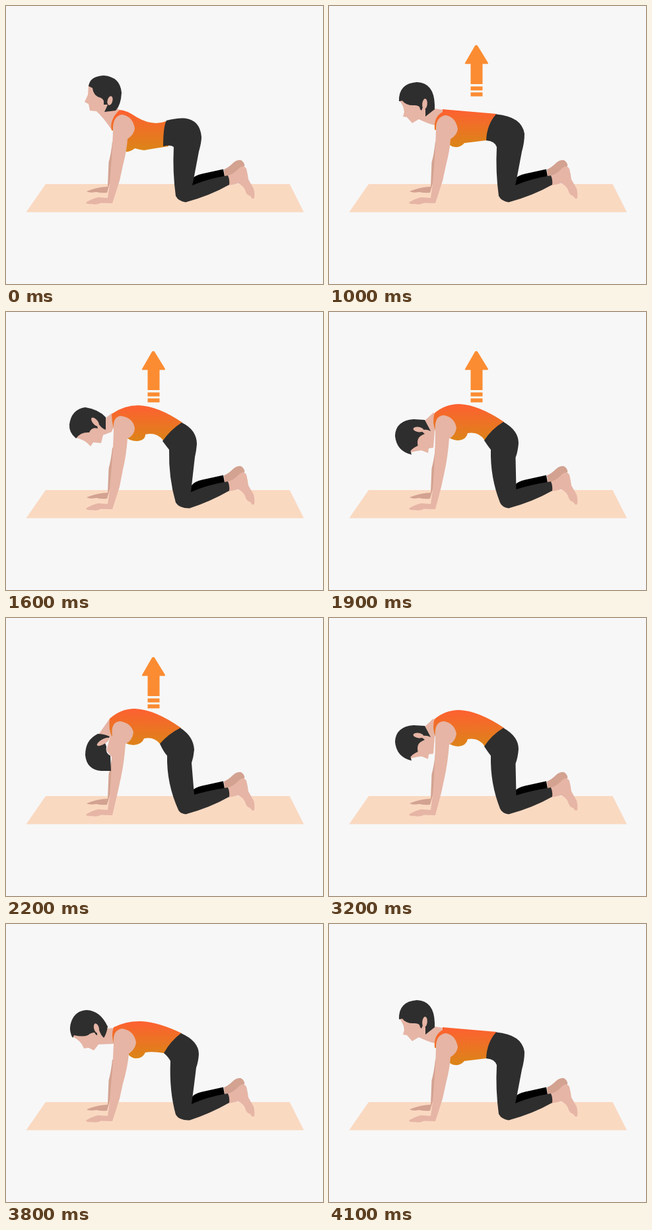
These frames come from a looping animation (480 by 420 pixels, 4600 ms). An HTML page:

```html
<!DOCTYPE html>
<html lang="en">
<head>
<meta charset="utf-8">
<title>Cat stretch</title>
<style>
  html, body { margin: 0; width: 100%; height: 100%; overflow: hidden; background: #f7f7f7; }
  svg { display: block; width: 480px; height: 420px; }
  .skin { fill: #e6b5a5; }
  .shade { fill: #d3a291; }
  .dark { fill: #2e2e2e; }
  .top { fill: url(#fabric); }
  .pose { opacity: 0; }
</style>
</head>
<body>
<svg id="stage" viewBox="0 0 480 420">
  <defs>
    <linearGradient id="fabric" x1="0" y1="0" x2="0" y2="1">
      <stop offset="0.05" stop-color="#fc6230"/>
      <stop offset="0.95" stop-color="#dc8418"/>
    </linearGradient>
  </defs>
  <path fill="#fad9c1" d="M60 269H429.500L451 311.500H30.500Z"/>
  <path class="shade" d="M330 247Q337 244 344 237Q350 232 356 233Q362 237 361 242L345 254L331 258Z"/>
  <path d="M276 272L281 262Q285 256 297 253.500L329 246.500L331 258L284 274Z"/>
  <path class="skin" d="M336 257Q347 252 353 245Q360 239 364 246Q366 254 367 262L375 276Q377 284 376 290Q373 293 370 287Q365 286 363 281Q361 272 352 268L337 271Z"/>
  <path class="shade" d="M161 205Q159 224 155.500 236L154 273Q140 273 122 280Q126 283 137 281Q144 283 153 282L165 240L166 205Z"/>
  <g id="poses"></g>
  <g id="arrow" class="pose" fill="#fb8c32">
    <path d="M221 60Q223 58 225 60L241 86Q241 87.500 240 87.500H232.500V118H214.500V87.500H207Q205 87.500 206 86Z"/>
    <path d="M214.500 121.500h18v6h-18zM214.500 130.500h18v6h-18z"/>
  </g>
</svg>
<script>
  const LOOP = 4600;

  // Parts shared by every pose: hand with wrist, and the near shin.
  const HAND = 'M161 298L144 297.500Q136 301 130 299Q123 300 121 297Q128 292 139 289L154 290Q157 272 158 255';
  const SHIN = 'Q305 261 336 256Q339 263 338 270Q309 286.500 ';

  // ear: cx, cy, rx, ry, tilt
  const poses = {
    arch: {
      face: 'M125 119L124 134L119 145L125 148L127 158L137 159Q147 168 160 187L174 170L172 157L160 150L140 112Z',
      hair: 'M125 121Q127 106 148 105Q173 107 175 131Q174 150 166 158L149 160Q152 154 154 149L148 149Q149 141 144 139Q132 136 131 124Z',
      ear: [157.5, 143, 3.8, 7, 15],
      top: 'M172 157Q182 157 198 168Q222 182 243 174L246 212Q225 215 209 218Q202 217 195 215Q188 221 181 220L178 190L160 188Q156 172 172 157Z',
      legs: 'M243 173Q258 169 270 169.500Q294 172 296 198Q296 206 292 220L284 262L282 271' + SHIN + '272 296.500Q261 295 257 287Q252 250 254 213Q249 209 238 212Q238 182 243 173Z',
      arm: 'Q161 220 162 188Q161 166 176 164Q192 167 195 185Q194 194 184 201Q183 218 177 241L172 264Z'
    },
    flat: {
      face: 'M106 142Q113 150 114 160L112 167L118 168L126 177L136 171Q150 178 160 180L166 172L174 157L160 155L140 130Z',
      hair: 'M106 144Q105 117 133 115Q159 116 160 149L160 156L146 167L146 156L142 153L140 158L138 156Q138 150 130 150Q117 151 111 143Z',
      ear: [145, 148, 3.8, 8, 5],
      top: 'M172 156L254 163L246 204L238 203Q222 205 205 207Q199 214 191 213Q186 213 182 209L178 190L160 187Q158 168 172 160Z',
      legs: 'M253 163.500Q292 167 296 193Q296 206 292 220L284 262L282 271' + SHIN + '272 296.500Q261 295 257 287Q252 250 254 213Q251 204 238 203Q239 179 253 163.500Z',
      arm: 'Q161 220 162 188Q161 167 177 165Q192 168 195 186Q194 195 184 201Q183 218 177 241L172 264Z'
    },
    rise: {
      face: 'M98 169Q110 174 115 182L118 188L125 187L133 191L140 182L163 181L168 165L163 157L153 158L125 150Z',
      hair: 'M101 172Q94 160 99 147Q105 131 122 130Q143 131 154 155Q152 167 148 172Q143 167 141 160L138 161L138 168Q136 168 134 164Q129 164 124 168Q117 171 103 168Z',
      ear: [137, 157.5, 3.8, 7.5, -15],
      top: 'M163 156Q183 146 205 147Q230 148 266 165L246 198L239 195Q222 192 211 194Q207 203 197 203Q191 203 186 198L178 184L163 180Q159 167 163 156Z',
      legs: 'M265 165Q292 177 292 197Q291 209 288 217Q285 242 281 272' + SHIN + '278 296.500Q262 297 257 288Q247 252 249 207Q246 201 239 195Q249 177 265 165Z',
      arm: 'Q162 218 163 180Q161 160 176 158Q194 161 197 179Q196 189 186 196Q184 218 177 241L172 264Z'
    },
    round: {
      face: 'M106 190Q120 193 128 203L132 197L144 198L147 186L160 181L166 165L160 153L151 160L125 165Z',
      hair: 'M106 191Q95 182 96 170Q99 147 120 144Q140 147 151 159L151 178Q144 175 141 170L138 172L139 176Q130 173 126 182Q113 181 106 191Z',
      ear: [135, 166, 3.8, 8, -40],
      top: 'M160 154Q178 141 201 141Q230 142 267 167L244 198L238 194Q228 181 211 185Q211 194 198 195Q190 195 184 191L178 180L163 177Q160 165 160 154Z',
      legs: 'M266 167Q289 178 289 200Q288 211 286 219Q283 245 280 272' + SHIN + '278 296.500Q263 297 257 288Q246 250 247 208Q243 203 237 195Q249 178 266 167Z',
      arm: 'Q162 215 163 178Q161 158 174 157Q193 160 195 176Q194 187 184 191Q182 218 177 238L172 264Z'
    },
    curl: {
      face: 'M124 212L133 210L140 209L150 213L151 206L158 205L160 180L166 165L158 152L144 165L125 190Z',
      hair: 'M125 215.500Q102 210 100 187Q101 164 128 162L145 163L154 180Q148 177 143 178L140 180L145 184Q138 187 136 190Q133 194 134.500 202Q126 206 123.500 210Z',
      ear: [135.5, 177.5, 8, 3.8, 8],
      top: 'M159.500 153Q176 139 197 139Q226 140 265 166L242 198L236 194Q227 180 210 183Q208 193 196 194Q189 194 182 190L176 180L161 178Q156 168 159.500 153Z',
      legs: 'M264 166Q287 179 287 198Q286 211 282.500 220L283.500 268' + SHIN + '272 296.500Q262 295 259 288Q244 250 245 208Q241 203 235 194Q246 177 264 166Z',
      arm: 'Q161 210 161 178Q159 157 174 156Q190 159 193 175Q191 187 182 191Q180 218 175 241L170 264Z'
    },
    cat: {
      face: 'M157 152L140 176L157 182L152 200L160 210L168 180L164 160Z',
      hair: 'M157 179Q148 175 139 175Q120 184 120 207Q122 229 144 231L159 231L158 208Q150 204 152 194L150 189Z',
      ear: [147, 187, 10.5, 3.8, -30],
      top: 'M157 152Q174 137 195 137Q225 138 265 166L240 196L233 190Q224 179 209 182Q206 191 193 192Q187 192 181 189L176 180L160 178Q155 168 157 152Z',
      legs: 'M264 166Q284 179 285 199Q284 210 281 219Q283 243 285 267' + SHIN + '272 296.500Q263 295 261 290Q243 250 244 208Q239 203 233 190Q246 175 264 166Z',
      arm: 'Q161 210 161 178Q158 157 173 156Q190 159 193 173Q191 186 181 190Q179 218 174 241L169 264Z'
    }
  };

  const steps = [
    [0, 'arch'], [1000, 'flat'], [1300, 'rise'], [1600, 'round'], [1900, 'curl'],
    [2200, 'cat'], [3200, 'curl'], [3500, 'round'], [3800, 'rise'], [4100, 'flat']
  ];

  const path = (cls, d) => `<path class="${cls}" d="${d}"/>`;

  function drawPose(name, p) {
    const [cx, cy, rx, ry, tilt] = p.ear;
    return `<g class="pose" id="${name}">`
      + path('skin', p.face)
      + path('dark', p.hair)
      + `<ellipse class="skin" cx="${cx}" cy="${cy}" rx="${rx}" ry="${ry}" transform="rotate(${tilt} ${cx} ${cy})"/>`
      + path('top', p.top)
      + path('dark', p.legs)
      + path('skin', HAND + p.arm)
      + '</g>';
  }

  // Hard on/off switching at each step time.
  function blink(id, isOn) {
    const frames = steps.map(([time, pose]) => ({
      offset: time / LOOP,
      opacity: isOn(time, pose) ? 1 : 0,
      easing: 'step-end'
    }));
    frames.push({ ...frames[frames.length - 1], offset: 1 });
    document.getElementById(id).animate(frames, { duration: LOOP, iterations: Infinity });
  }

  document.getElementById('poses').innerHTML =
    Object.entries(poses).map(([name, p]) => drawPose(name, p)).join('');

  Object.keys(poses).forEach(name => blink(name, (time, pose) => pose === name));
  blink('arrow', time => time >= 1000 && time < 3200);
</script>
</body>
</html>
```
